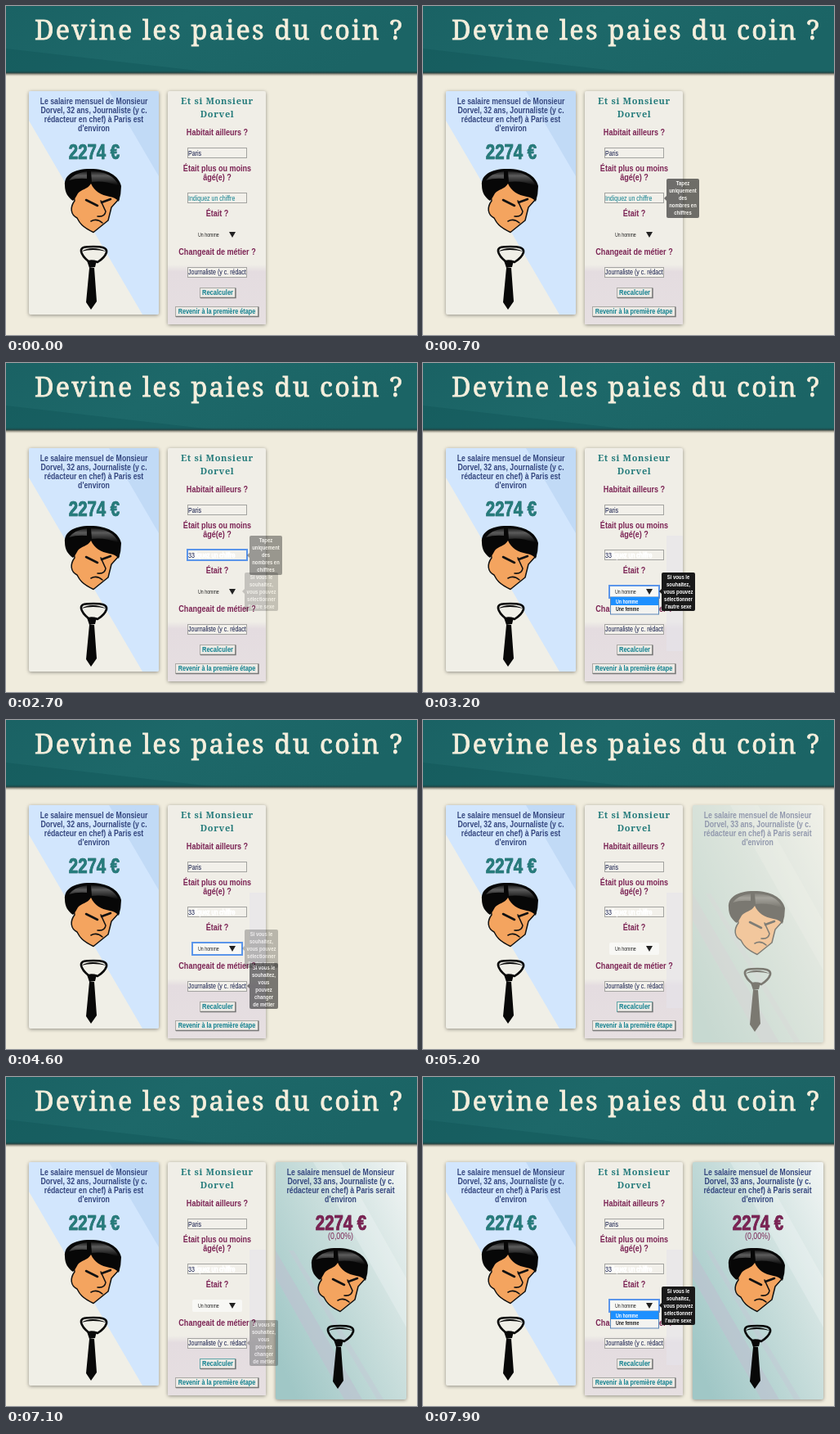
Animation, 503 px wide and 402 px high, one loop 8000 ms. Source, as an HTML page:

```html
<!DOCTYPE html>
<html lang="fr">
<head>
<meta charset="utf-8">
<style>
html, body { margin: 0; width: 100%; height: 100%; overflow: hidden; background: #f0ecdd; }
svg { display: block; width: 503px; height: 402px; }
text { font-family: "Liberation Sans", Arial, sans-serif; text-anchor: middle; white-space: pre; }
.b { font-weight: bold; }
.l { text-anchor: start; }
.type { font-family: "Noto Serif", serif; letter-spacing: .06em; }
.title { stroke: #f5efdd; stroke-width: .8; letter-spacing: .07em; }
.card { filter: drop-shadow(0 1px 2px #0006); }
.num { filter: drop-shadow(.5px .5px .7px #0006); stroke: currentColor; stroke-width: .7; }
.field { fill: #f2f0ea; stroke: #a3a3a0; }
.focus { fill: none; stroke: #5b95ea; stroke-width: 2; }
</style>
</head>
<body>
<svg id="stage" viewBox="0 0 503 402"></svg>
<script>
const INK = '#35477f', TEAL = '#267c7c', PLUM = '#7b2354', LINK = '#10808f', TYPED = '#101848';
const LOOP = 8000, NARROW = 0.8;

const text = (s, x, y, size, fill, cls = 'b', id = '') =>
  `<text id="${id}" class="${cls}" transform="translate(${x} ${y}) scale(${NARROW} 1)" font-size="${size}" fill="${fill}" color="${fill}">${s}</text>`;
const lines = (list, x, y, step, size, fill) =>
  list.map((s, i) => text(s, x, y + i * step, size, fill)).join('');
const rect = (x, y, w, h, attrs) => `<rect x="${x}" y="${y}" width="${w}" height="${h}" ${attrs}/>`;
const poly = (points, fill, extra = '') => `<polygon points="${points}" fill="${fill}" ${extra}/>`;
const group = (id, body) => `<g id="${id}">${body}</g>`;
const field = y => rect(222.5, y + .5, 72, 12, 'class="field"');

const tip = (id, x, y, w, h, arrowY, step, words) => group(id,
  rect(x, y, w, h, 'rx="2" fill="#191919"') +
  poly(`${x},${arrowY - 3} ${x - 3},${arrowY} ${x},${arrowY + 3}`, '#191919') +
  lines(words, x + w / 2, y + 8, step, 7.4, '#fff'));

const button = (x, y, w, label, size, id) =>
  rect(x + .5, y + .5, w, 12, `id="${id}" fill="#eceae5" stroke="#aaa9a5"`) +
  `<path d="M${x + 1} ${y + 12.5}h${w}v-12" fill="none" stroke="#777" stroke-width="1.4"/>` +
  text(label, x + w / 2 + .5, y + 9, size, LINK);

const salary = (x, age, verb) => lines([
  'Le salaire mensuel de Monsieur', `Dorvel, ${age} ans, Journaliste (y c.`,
  `rédacteur en chef) à Paris ${verb}`, "d'environ"], x, 120, 11, 10.9, INK);

const defs = `<defs>
  <linearGradient id="head" x2="1" y2=".25">
    <stop stop-color="#1a6264"/><stop offset=".45" stop-color="#1d6869"/><stop offset="1" stop-color="#1b6465"/>
  </linearGradient>
  <linearGradient id="edge" x2="0" y2="1">
    <stop stop-color="#0f4244" stop-opacity="0"/><stop offset=".4" stop-color="#2c4a48"/>
    <stop offset=".55" stop-color="#77756a" stop-opacity=".9"/><stop offset="1" stop-color="#b5b0a2" stop-opacity="0"/>
  </linearGradient>
  <linearGradient id="mist" x1="1" x2="0" y2=".8">
    <stop stop-color="#f2f5f4"/><stop offset=".45" stop-color="#cbdfdd"/><stop offset="1" stop-color="#a0c7c6"/>
  </linearGradient>
  <linearGradient id="floor" x2="0" y2="1">
    <stop stop-color="#e4dce0" stop-opacity="0"/><stop offset=".12" stop-color="#e4dce0"/><stop offset="1" stop-color="#e6dfe1"/>
  </linearGradient>
  <linearGradient id="shine" x2="0" y2="1">
    <stop stop-color="#222"/><stop offset=".3" stop-color="#777"/><stop offset="1" stop-color="#000"/>
  </linearGradient>
  <clipPath id="leftClip">${rect(28, 104, 159, 273, 'rx="2"')}</clipPath>
  <clipPath id="rightClip">${rect(330, 104, 160, 290, 'rx="2"')}</clipPath>
  <clipPath id="jobClip">${rect(223, 319, 71, 13, '')}</clipPath>
  <g id="man" stroke-linejoin="round" stroke-linecap="round">
    <path d="M88 216Q82 230 84 238C78 246 79 255 87 259C90 265 93 270 107 276.500L125 262L129 246L138 236L128 216Z" fill="#f4a45f" stroke="#111" stroke-width="1.5"/>
    <path d="M72 219C71 207 82 199 103 199C124 199 138 207 141 220Q141 230 138 239Q134 234 127 233C116 231 108 226 104 217C100 224 92 224 88 229Q85 235 82 238C76 234 72 228 72 219Z" fill="#070707"/>
    <path d="M104 202C121 202 134 208 138 220Q121 213 105 215ZM77 213Q84 204 99 202L99 211Q86 210 77 213Z" fill="url(#shine)" opacity=".75"/>
    <g fill="none" stroke="#111" stroke-width="1.6">
      <path d="M116 238L122 251Q121 258 112 257M104 263Q111 259 118 265"/>
      <path d="M98 237L112 244M117 240L128 236" stroke-width="2.6"/>
    </g>
    <path d="M92 300C91 294 98 294 107 294C117 294 124 295 123 301C121 307 117 310 112 313Q106 311 101 312C96 308 93 305 92 300Z" fill="none" stroke="#080808" stroke-width="2.6"/>
    <path d="M92 300Q105 292 123 300Q106 296 92 300Z" fill="#080808"/>
    <path d="M99 311L111 311L109 319L102 320ZM102 320L108 320L111 361L104 371L98 362Z" fill="#080808"/>
  </g>
</defs>`;

const header = rect(0, 0, 503, 82, 'fill="url(#head)"') +
  poly('0,52 260,82 0,82', '#0d4c50', 'opacity=".3"') +
  rect(0, 79, 503, 7, 'fill="url(#edge)"') +
  `<text class="type title" x="261" y="41" font-size="32.3" fill="#f5efdd">Devine les paies du coin ?</text>`;

const left = rect(28, 104, 159, 273, 'rx="2" fill="#f0efe7" class="card"') +
  `<g clip-path="url(#leftClip)">` +
  poly('28,104 187,104 187,377 167,377 28,140', '#d2e6fd') +
  poly('126,104 187,104 187,208', '#c1daf6') + '</g>' +
  salary(107.5, 32, 'est') + text('2274 €', 108, 187, 25.5, TEAL, 'b num') + '<use href="#man"/>';

const form = rect(198, 104, 120, 285, 'rx="2" fill="#f0eee7" class="card"') +
  rect(198, 316, 120, 73, 'fill="url(#floor)"') +
  rect(298, 211, 20, 141, 'id="trace" fill="#e6e5ec"') +
  ['Et si Monsieur', 'Dorvel'].map((s, i) =>
    `<text class="type b" x="258.5" y="${120 + 16 * i}" font-size="11" fill="${TEAL}">${s}</text>`).join('') +
  [['Habitait ailleurs ?', 158], ['Était plus ou moins', 202], ['âgé(e) ?', 213], ['Était ?', 257],
   ['Changeait de métier ?', 304]].map(([s, y]) => text(s, 258.5, y, 11.3, PLUM)).join('') +
  field(173) + field(228) + field(319) +
  text('Paris', 223, 183, 8.8, TYPED, 'l') +
  text('Indiquez un chiffre', 223, 238, 8.8, LINK, 'l', 'hint') +
  text('', 223, 238, 8.8, TYPED, 'l', 'typed') +
  rect(223, 230, 1, 10, 'id="caret" fill="#222"') +
  rect(222, 228, 73, 13, 'id="ageFocus" class="focus"') +
  `<g clip-path="url(#jobClip)">${text('Journaliste (y c. rédacteur', 223, 328, 8.8, TYPED, 'l')}</g>` +
  rect(228, 272, 61, 15, 'id="select" rx="2" fill="#f8f8f5"') +
  text('Un homme', 235, 282, 6.6, '#222', 'l') + poly('273,276 281,276 277,283', '#222') +
  rect(228, 272, 61, 15, 'id="selectFocus" class="focus"') +
  button(237, 344, 43, 'Recalculer', 9.4, 'go') +
  button(207, 367, 101, 'Revenir à la première étape', 9.1, 'back');

const menu = group('menu',
  rect(229.5, 286, 59, 21, 'fill="#f3f3f0" stroke="#5a86b8"') +
  rect(230, 286, 58, 10, 'id="pick" fill="#1e90ff"') +
  text('Un homme', 236, 293.5, 6.6, '#fff', 'b l', 'manItem') +
  text('Une femme', 236, 303, 6.6, '#222', 'b l', 'womanItem'));

const result = group('result',
  rect(330, 104, 160, 290, 'rx="2" fill="url(#mist)" class="card"') +
  `<g clip-path="url(#rightClip)">` +
  poly('330,212 330,245 414,394 436,394', '#bdc3d0', 'opacity=".7"') +
  poly('346,212 352,212 462,394 454,394', '#c3cad6', 'opacity=".5"') +
  poly('376,104 410,104 490,246 490,306', '#fff', 'opacity=".22"') + '</g>' +
  salary(409.5, 33, 'serait') + '<use href="#man" x="302" y="10"/>' +
  group('amount', text('2274 €', 410, 187, 25.5, PLUM, 'b num') + text('(0,00%)', 409.5, 198, 11, PLUM, '')));

const tips =
  tip('ageTip', 298, 211, 40, 48, 235, 9, ['Tapez', 'uniquement', 'des', 'nombres en', 'chiffres']) +
  tip('sexTip', 292, 256, 41, 47, 279, 9, ['Si vous le', 'souhaitez,', 'vous pouvez', 'sélectionner', "l'autre sexe"]) +
  tip('jobTip', 298, 297, 35, 56, 325, 9, ['Si vous le', 'souhaitez,', 'vous', 'pouvez', 'changer', 'de métier']);

document.getElementById('stage').innerHTML = defs + header + left + form + menu + result + tips;

const el = id => document.getElementById(id);
const show = (id, alpha) => el(id).setAttribute('opacity', alpha);
const paint = (id, fill) => el(id).setAttribute('fill', fill);

function draw(now) {
  const t = Math.floor(now % LOOP / 100) * 100;
  const on = (from, to = LOOP) => +(t >= from && t < to);
  const rise = (from, steps) => Math.max(0, Math.min(1, ((t - from) / 100 + 1) / steps));

  show('ageTip', rise(500, 5) - rise(2500, 5));
  show('sexTip', rise(2700, 5) - rise(4400, 4) + rise(7400, 5));
  show('jobTip', .7 * (rise(200, 2) - rise(500, 3)) +
    .25 * on(4500, 4600) + .55 * on(4600, 4700) + .3 * on(7100, 7200));
  show('trace', .6 * on(2900));

  show('ageFocus', on(1200, 3200));
  show('caret', on(1200, 1700));
  paint('hint', on(2200) ? '#fff' : LINK);
  el('hint').setAttribute('stroke', on(2200) ? '#fff' : 'none');
  el('typed').textContent = '3'.repeat(on(2200) + on(2300));

  show('select', on(3200));
  show('selectFocus', on(3200, 5200) + on(7900));
  show('menu', on(3200, 4400) + on(7900));
  const woman = on(3600, 3900);
  el('pick').setAttribute('y', woman ? 296 : 286);
  paint('manItem', woman ? '#222' : '#fff');
  paint('womanItem', woman ? '#fff' : '#222');

  el('go').setAttribute('stroke', on(4700, 7200) ? '#5fa5a8' : '#aaa9a5');
  show('result', rise(5200, 2));
  show('amount', on(5500));
}

const start = performance.now();
function frame() {
  draw(performance.now() - start);
  requestAnimationFrame(frame);
}
frame();
</script>
</body>
</html>
```
